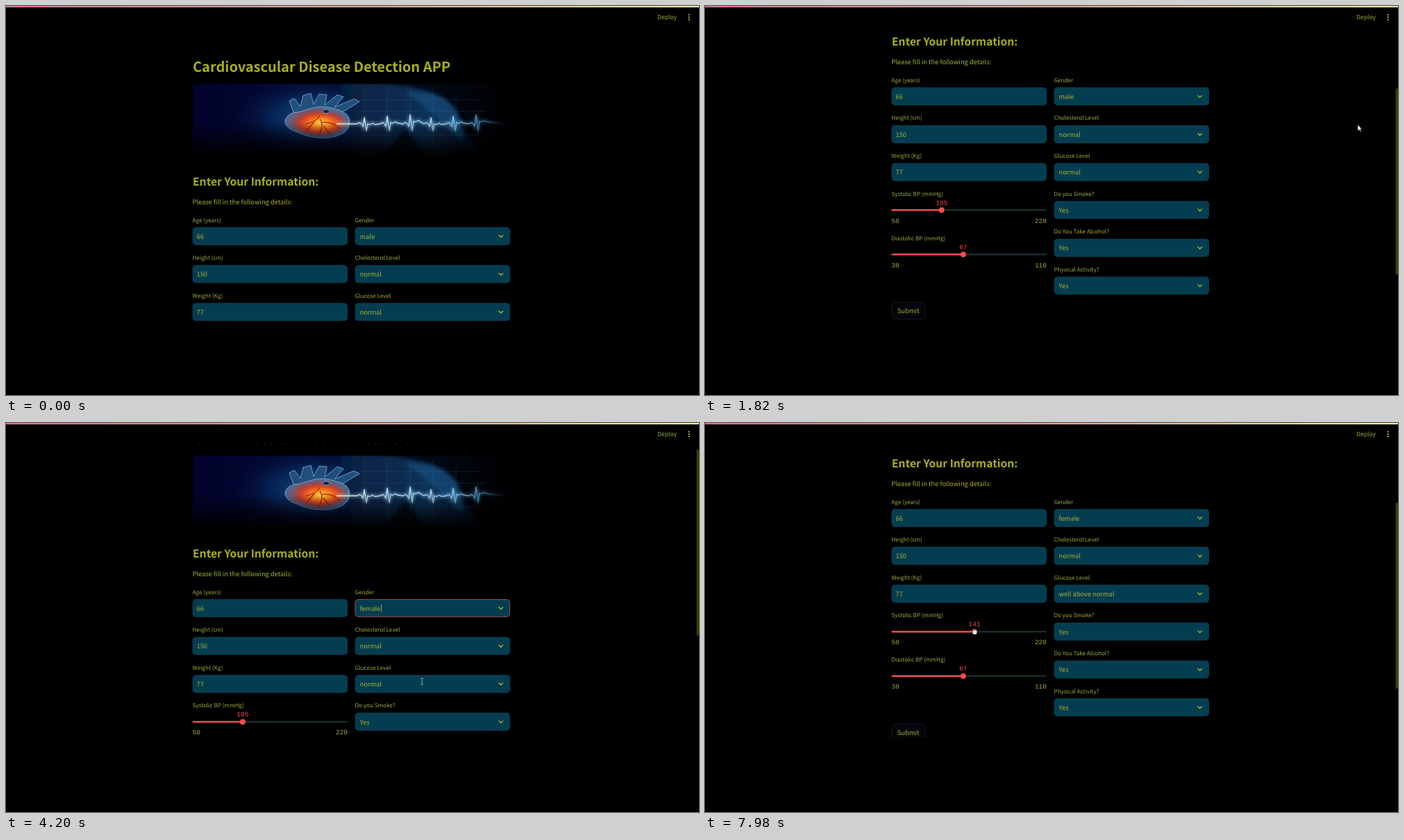
An HTML page that plays this animation: 998 by 561 pixels, repeating every 8 s.

```html
<!DOCTYPE html>
<html lang="en">
<head>
<meta charset="utf-8">
<title>Cardiovascular Disease Detection APP</title>
<style>
  html, body { margin: 0; width: 100%; height: 100%; overflow: hidden; background: #000; }
  svg { display: block; width: 100vw; height: 100vh; }
  text {
    font-family: "Source Sans Pro CJK", "Noto Sans CJK JP", "Noto Sans CJK SC", "Noto Sans CJK", "Open Sans", sans-serif;
    font-size: 9.3px; fill: #a9b030; text-rendering: geometricPrecision; white-space: pre;
  }
  .title { font-size: 20px; font-weight: 700; fill: #a9af20; }
  .subtitle { font-size: 15.65px; font-weight: 700; fill: #a9af20; }
  .label { font-size: 8.15px; fill: #a3a742; }
  .mono { font-family: "Liberation Mono", monospace; font-size: 9.5px; fill: #a3a742; }
  .value { fill: #f04a50; text-anchor: middle; }
  .end { text-anchor: end; }
  .field { fill: #053d50; }
  .focus { fill: none; stroke: #c4484c; stroke-width: .8; }
  .chevron { fill: none; stroke: #b4bc2c; stroke-width: 1.3; stroke-linecap: round; stroke-linejoin: round; }
  .cursor > * { fill: #fff; stroke: #000; stroke-width: .6; }
</style>
</head>
<body>
<svg id="stage" viewBox="0 0 998 561" preserveAspectRatio="none"></svg>
<script>
const LOOP = 8000, ROW = 54.6, LEFT = 268.5, RIGHT = 502.5, WIDTH = 223.5;
const stage = document.getElementById('stage');

const text = (x, y, str, cls = '', id = '') =>
  `<text x="${x}" y="${y}" class="${cls}" id="${id}">${str}</text>`;
const box = (x, y, w, h, attrs) => `<rect x="${x}" y="${y}" width="${w}" height="${h}" ${attrs}/>`;

function field(x, row, label, value, id = '') {
  const y = 319 + row * ROW;
  const isSelect = x === RIGHT;
  return text(x, y - 7.4, label, 'label')
    + box(x, y, WIDTH, 26, 'rx="5" class="field"')
    + text(x + (isSelect ? 7 : 6), y + 16.7, value, '', id)
    + (isSelect ? `<path class="chevron" d="M${x + 207.4} ${y + 11.8}l2.8 2.8 2.8-2.8"/>` : '')
    + (id ? box(x + .4, y + .4, WIDTH - .8, 25.2, `rx="5" class="focus" id="${id}Focus"`)
      + box(0, y + 8, .8, 10.5, `fill="#b4bc50" id="${id}Caret"`) : '');
}

function slider(y, label, min, max, value, id) {
  const x = LEFT + (value - min) / (max - min) * WIDTH;
  return text(LEFT, y - 20.6, label, 'label')
    + box(LEFT, y - 1.3, WIDTH, 2.6, 'rx="1.3" fill="#182c30"')
    + box(LEFT, y - 1.3, x - LEFT, 2.6, `rx="1.3" fill="#f04a50" id="${id}Fill"`)
    + `<circle cx="${x}" cy="${y}" r="4" fill="#ff4b4f" id="${id}Thumb"/>`
    + text(x, y - 7.6, value, 'mono value', id + 'Value')
    + text(LEFT, y + 18.3, min, 'mono')
    + text(LEFT + WIDTH, y + 18.3, max, 'mono end');
}

function menu(id, y, options, selected) {
  const rows = options.map((name, i) =>
    (i === selected ? box(RIGHT, y + i * 26, WIDTH, 25.5, 'fill="#063b4b"') : '')
    + text(513, y + i * 26 + 16.5, name)).join('');
  const h = options.length * 26;
  return `<g id="${id}">${box(RIGHT, y, WIDTH, h, 'rx="4" fill="#000102" fill-opacity=".96" stroke="#0b2b34" stroke-width=".7"')}${rows}</g>`;
}

const pulse = [515, 548, 581, 611, 643, 676].map((x, i) => {
  const h = 9 + (i % 3) * 2;
  return `L${x - 9} 170l3-2 3 2 2 4 2-${h + 4} 3 ${h + 10} 2-${h + 1} 3 1 4-2 3 2`;
}).join('');

const banner = `
<g clip-path="url(#bannerClip)">
  <rect x="269" y="112" width="457" height="110" fill="url(#navy)"/>
  <ellipse cx="445" cy="160" rx="128" ry="62" fill="url(#halo)"/>
  <path d="M482 112Q565 108 618 126Q654 142 662 182L690 222H606L574 184Q548 222 500 222Z" fill="url(#torso)" filter="url(#soft)"/>
  <path d="M574 124Q630 122 648 151Q657 168 659 196Q637 180 622 163Q602 141 574 124Z" fill="#17507f" opacity=".65" filter="url(#soft)"/>
  <path d="M569 183L577 179 606 222H548Z" fill="#010713" filter="url(#soft)"/>
  <path d="M516 116V192M549 122V208M582 116V204M615 118V202M648 128V194M680 150V186M510 135H682M510 152H690M510 186H680" stroke="#3584b4" stroke-width=".6" opacity=".35"/>
  <g stroke="#7fb4da" stroke-width=".8" stroke-linejoin="round">
    <path d="M414 153L408 137 415 133 424 145 428 129 439 126 443 142 451 127 462 128 459 143 477 128 486 131 473 146 501 134 509 138 481 155Q470 164 451 158Z" fill="#214f7c"/>
    <path d="M402 164Q407 153 421 153L438 148Q455 142 475 149Q497 154 495 170Q492 186 466 190Q438 192 420 182Q400 176 402 164Z" fill="url(#muscle)"/>
  </g>
  <ellipse cx="453" cy="169" rx="38" ry="18" fill="url(#ember)"/>
  <path d="M452 158Q447 167 432 170M452 163Q459 174 449 187M455 168Q470 166 481 177M444 167L432 181M457 173L467 185" fill="none" stroke="#a51e14" stroke-width="1.2"/>
  <ellipse cx="461" cy="152" rx="5" ry="3" fill="#13294c" stroke="#a8c9e6" stroke-width=".7"/>
  <path id="beat" d="M476 170L494 170${pulse}L722 170" fill="none" stroke="url(#wave)" stroke-width="4" opacity=".45" filter="url(#glow)"/>
  <path d="M476 170L494 170${pulse}L722 170" fill="none" stroke="url(#wave)" stroke-width="1.3" stroke-linejoin="round"/>
  <rect x="269" y="112" width="457" height="110" fill="url(#fade)"/>
</g>`;

const stop = (at, color, alpha = 1) => `<stop offset="${at}" stop-color="${color}" stop-opacity="${alpha}"/>`;
const defs = `<defs>
  <clipPath id="view"><rect y="30" width="998" height="424.5"/></clipPath>
  <clipPath id="bannerClip"><rect x="269" y="112" width="457" height="110"/></clipPath>
  <linearGradient id="ribbon">${stop(0, '#d7708c')}${stop(.5, '#dfa08a')}${stop(1, '#ecea98')}</linearGradient>
  <linearGradient id="navy">${stop(0, '#02022c')}${stop(.35, '#020a32')}${stop(.75, '#010814')}${stop(1, '#000')}</linearGradient>
  <radialGradient id="halo">${stop(0, '#12508c')}${stop(.5, '#08285c', .8)}${stop(1, '#020a30', 0)}</radialGradient>
  <linearGradient id="torso">${stop(0, '#06203f')}${stop(.6, '#0a3158')}${stop(1, '#030d1a')}</linearGradient>
  <radialGradient id="muscle">${stop(0, '#ff9a32')}${stop(.55, '#a8443d')}${stop(1, '#496a96')}</radialGradient>
  <radialGradient id="ember">${stop(0, '#ffd34a')}${stop(.35, '#ff8a1e')}${stop(.7, '#e04420', .85)}${stop(1, '#a83c3c', 0)}</radialGradient>
  <linearGradient id="wave" gradientUnits="userSpaceOnUse" x1="476" x2="722">${stop(0, '#fff2c0')}${stop(.12, '#c8ecff')}${stop(.65, '#9cd4f8')}${stop(.85, '#3c7caa')}${stop(1, '#10304c', 0)}</linearGradient>
  <linearGradient id="fade" x2="0" y2="1">${stop(.5, '#000', 0)}${stop(.95, '#000')}</linearGradient>
  <filter id="soft" x="-20%" y="-20%" width="140%" height="140%"><feGaussianBlur stdDeviation="2.5"/></filter>
  <filter id="glow" x="-5%" y="-50%" width="110%" height="200%"><feGaussianBlur stdDeviation="2"/></filter>
</defs>`;

stage.innerHTML = defs + `
<g clip-path="url(#view)">
  <g id="page">
    ${text(269, 95.1, 'Cardiovascular Disease Detection APP', 'title')}
    ${banner}
    ${text(269, 259, 'Enter Your Information:', 'subtitle')}
    ${text(LEFT, 286, 'Please fill in the following details:')}
    ${field(LEFT, 0, 'Age (years)', 66)}
    ${field(LEFT, 1, 'Height (cm)', 150)}
    ${field(LEFT, 2, 'Weight (Kg)', 77)}
    ${field(RIGHT, 0, 'Gender', 'male', 'gender')}
    ${field(RIGHT, 1, 'Cholesterol Level', 'normal')}
    ${field(RIGHT, 2, 'Glucose Level', 'normal', 'glucose')}
    ${field(RIGHT, 3, 'Do you Smoke?', 'Yes')}
    ${field(RIGHT, 4, 'Do You Take Alcohol?', 'Yes')}
    ${field(RIGHT, 5, 'Physical Activity?', 'Yes')}
    ${slider(496, 'Systolic BP (mmHg)', 50, 220, 105, 'systolic')}
    ${slider(560, 'Diastolic BP (mmHg)', 30, 110, 67, 'diastolic')}
    ${box(268.9, 628.7, 48.6, 25, 'rx="5" fill="#04060c" stroke="#1b1c20" stroke-width=".8"')}
    ${text(277, 644.5, 'Submit')}
    ${box(LEFT, 668.5, 457.5, 5.4, 'rx="2.6" class="field"')}
  </g>
  ${box(994.5, 0, 3.5, 268, 'fill="#394004" id="scrollbar"')}
</g>
${menu('genderMenu', 281, ['male', 'female'], 0)}
${menu('glucoseMenu', 284, ['normal', 'above normal', 'well above normal'], 0)}
${box(0, 0, 998, 2, 'fill="url(#ribbon)"')}
${text(938, 19.2, 'Deploy', 'label" style="font-size:8.6px')}
${[12.7, 16.2, 19.7].map(y => `<circle cx="983.6" cy="${y}" r="1.15" fill="#b4b850"/>`).join('')}
<g id="pointer" class="cursor">
  <path id="arrow" d="M0 0V9.2L2.1 7.3 3.6 10.4 5 9.8 3.6 6.7H6.2Z"/>
  <path id="hand" d="M-1.6 1a1 1 0 0 1 2 0V5L4 5.6Q5.2 6 5.2 7.2V9Q5 11.5 3.8 13H-1L-3.9 8.4Q-3.2 7-1.6 8.6Z"/>
  <path id="grab" d="M-3 2Q-2 0 0 .6Q3 0 3.2 2V4Q3 6 2 7H-2L-3.4 4Z"/>
  <path id="beam" d="M-2.2-4.6Q0-4.6 0-3.4Q0-4.6 2.2-4.6M0-3.4V3.4M-2.2 4.6Q0 4.6 0 3.4Q0 4.6 2.2 4.6" style="fill:none;stroke:#a9a9a9;stroke-width:.9"/>
</g>`;

const el = id => document.getElementById(id);
const show = (id, on) => { el(id).style.display = on ? '' : 'none'; };

const smooth = p => p * p * (3 - 2 * p);

// Eased value of a [time, ...values] table
function tween(table, t) {
  const next = table.findIndex(row => row[0] > t);
  if (next === 0) return table[0].slice(1);
  if (next < 0) return table[table.length - 1].slice(1);
  const a = table[next - 1], b = table[next];
  const p = smooth((t - a[0]) / (b[0] - a[0]));
  return a.slice(1).map((v, i) => v + (b[i + 1] - v) * p);
}
const hold = (table, t) => table.filter(row => row[0] <= t).pop()[1];

const SCROLL = [[860, 0], [1380, 260], [1680, 260], [2140, 0], [2480, 0], [2640, 65],
  [5880, 65], [6180, 195]];
const POINTER = [[60, 153, 440], [620, 940, 171], [2300, 940, 171], [2800, 631, 274],
  [3150, 631, 274], [3450, 560, 318], [3700, 560, 318], [4250, 600, 374], [4500, 600, 374],
  [5000, 572, 343.5], [5250, 572, 343.5], [5800, 420, 300], [6300, 398, 295], [6450, 398, 295],
  [6850, 341, 295], [7100, 341, 298], [7960, 388.5, 298]];
const SHAPE = [[0, 'arrow'], [2700, 'beam'], [3250, 'hand'], [3700, 'arrow'], [4150, 'beam'],
  [4500, 'hand'], [5300, 'arrow'], [6250, 'hand'], [7050, 'grab']];
const SYSTOLIC = [[7100, 105], [7960, 141]];

function focusField(id, t, from, to) {
  const on = t >= from && t < to;
  show(id + 'Focus', on);
  show(id + 'Caret', on && (t - 2900) % 1000 < 500);
  if (on) el(id + 'Caret').setAttribute('x', RIGHT + 7.8 + el(id).getComputedTextLength());
}

function render(t) {
  const [scroll] = tween(SCROLL, t);
  el('page').setAttribute('transform', `translate(0 ${-scroll})`);
  el('scrollbar').setAttribute('y', scroll * .59);
  show('scrollbar', t >= 400);

  el('gender').textContent = t < 3560 ? 'male' : 'female';
  el('glucose').textContent = t < 5140 ? 'normal' : 'well above normal';
  focusField('gender', t, 3000, 4420);
  focusField('glucose', t, 4420, 7050);
  show('genderMenu', t >= 3000 && t < 3560);
  show('glucoseMenu', t >= 4420 && t < 5140);

  const value = Math.round(tween(SYSTOLIC, t)[0]);
  const x = LEFT + (value - 50) / 170 * WIDTH;
  el('systolicFill').setAttribute('width', x - LEFT);
  el('systolicThumb').setAttribute('cx', x);
  el('systolicValue').setAttribute('x', x);
  el('systolicValue').textContent = value;

  const [px, py] = tween(POINTER, t);
  const shape = hold(SHAPE, t);
  show('pointer', t >= 60);
  el('pointer').setAttribute('transform', `translate(${px} ${py})`);
  for (const name of ['arrow', 'hand', 'grab', 'beam']) show(name, name === shape);
}

const start = performance.now();
function tick() {
  render((performance.now() - start) % LOOP);
  requestAnimationFrame(tick);
}
tick();
</script>
</body>
</html>
```
